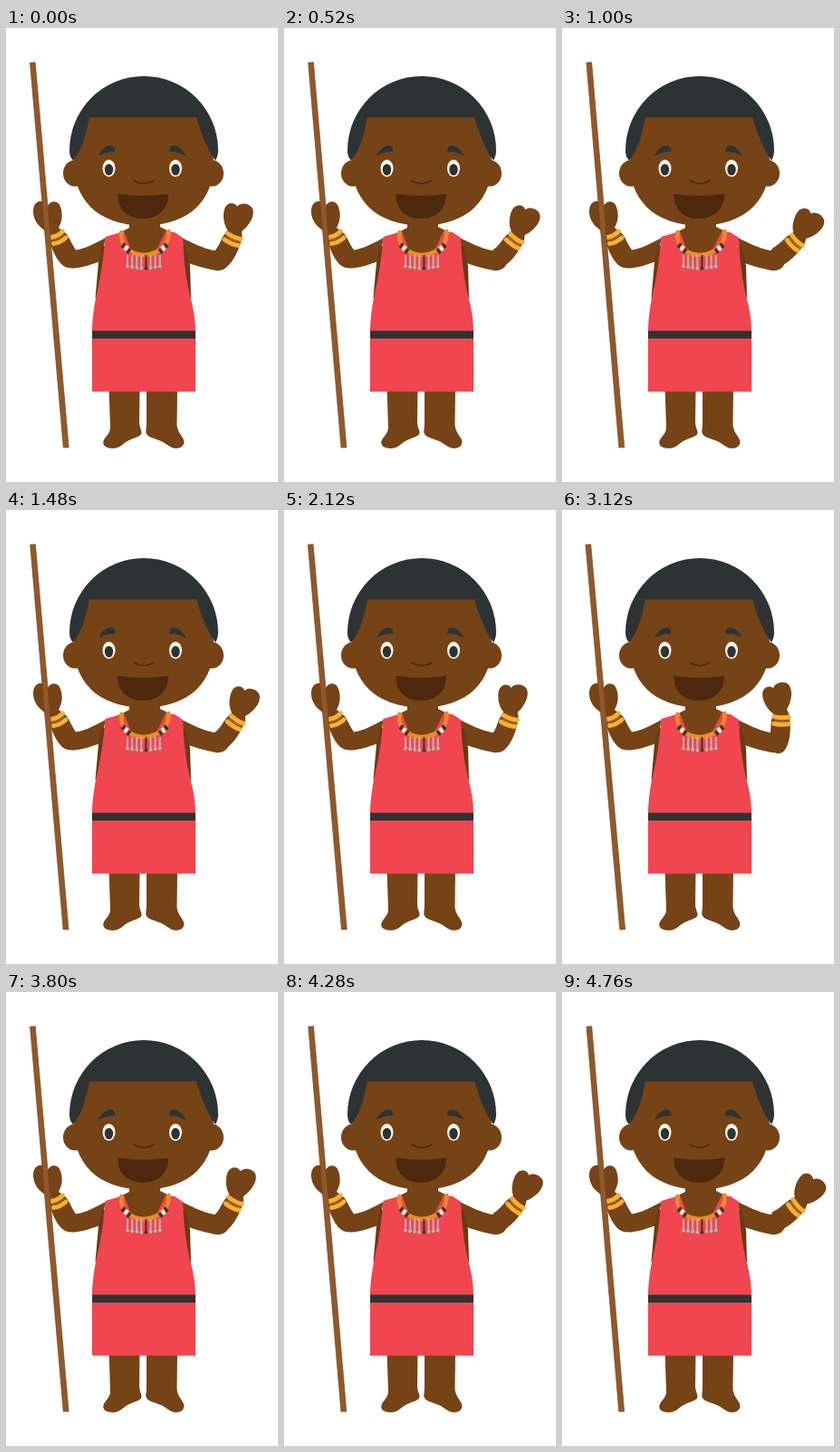
Recreate the animation shown at these times as an HTML page. Size 300x500 px, loop 4.8 s.

```html
<!DOCTYPE html>
<html lang="en">
<head>
<meta charset="utf-8">
<title>Waving child</title>
<style>
  html, body { margin: 0; width: 100%; height: 100%; overflow: hidden; background: #fff; }
  svg { display: block; width: 100vw; height: 100vh; }
  .skin { fill: #764316; }
  .shade { fill: #6a3a11; }
  .dark { fill: #2d3334; }
  .red { fill: #f0464f; }
  .gold { fill: none; stroke: #f6b032; stroke-width: 5; stroke-linecap: round; }
  .seam { fill: none; stroke: #b97a1c; stroke-width: 1; }
</style>
</head>
<body>
<svg viewBox="0 0 300 500" xmlns="http://www.w3.org/2000/svg">
  <!-- legs -->
  <path class="skin" d="M113.500 396H147.500L147 434C147 441 151 444 149 447.500C146 451 138 452 132 456C127 460 124 463 118 463C111 463 106 460 107.500 455C109 450 115 447 115 440Z"/>
  <path class="skin" d="M155 396H189L188.500 437C189 446 196 450 196.500 456C196 462 190 464 184 462.500C178 460 175 456 167 453.500C160 451 156 450 154.500 446C154 443 155 440 155 434Z"/>

  <!-- left arm -->
  <path class="skin" d="M110 231C98 237 88 243 77 244.500C73 239 71 233 67 227L58 220C62 213 63 205 60 197C58 190 49 189 46 196C43 189 34 189 31 196C28 204 32 215 39 220L46 226C49 240 54 253 61 260C68 267 79 266 104 257Z"/>
  <g class="gold">
    <path d="M49.500 230.500Q57 229.500 62.500 224"/>
    <path d="M52.500 237.500Q60 236.500 66 231"/>
  </g>
  <path class="seam" d="M50 234Q58 233 64 227.500"/>

  <!-- right arm -->
  <path class="skin" d="M194 231C206 237 216 242 229 245C240 245 246 250 246 257C245 265 238 268 231 267C220 265 210 262 198 258Z"/>
  <g id="wave">
    <path class="skin" d="M229 247C234 242 236 236 239 230L244.500 222.500C240 217 238.500 205 241.500 198C244 192 252 191 255 196.500C259 191.500 269 193 272 199C275 207 268 218 260 224L260.500 229C258 243 251 257 243.500 263C238 268 230 267 228 259Z"/>
    <g class="gold">
      <path d="M244 226Q252 231.500 259 232.500"/>
      <path d="M241 233Q249 238.500 256 239.500"/>
    </g>
    <path class="seam" d="M242.500 229.500Q250 235 258 236"/>
  </g>

  <!-- torso and dress -->
  <path class="shade" d="M106 240H198L203 262L204 297H98.500L102 258Z"/>
  <path class="skin" d="M136 205H170V219L182 225L160 252H144L124 226L136 220Z"/>
  <path class="red" d="M109.500 230L130 224L139 247Q152 251 165 247L176 224L186 225L195 231C196 258 199 278 203.500 297C207.500 312 209 323 209 336V400.500H95V336C95 322 96.500 311 99 297C104 277 107 258 109.500 230Z"/>

  <path class="dark" d="M95 333.500H209V342H95Z"/>

  <!-- necklace -->
  <path fill="none" stroke="#ea8b29" stroke-width="4.500" d="M128 223C124 239 136 249 152 250C168 249 182 239 179 222"/>
  <g id="beads"></g>

  <!-- head -->
  <ellipse class="skin" cx="76" cy="160" rx="13" ry="14.500"/>
  <ellipse class="skin" cx="227" cy="160" rx="13" ry="14.500"/>
  <path class="skin" d="M85 92H218L229 145C231 188 203 217.500 152 217.500C101 217.500 73 188 75 145Z"/>
  <path class="dark" d="M74 146C71 143 70 139 70 135A82 82 0 0 1 234 135C234 139 233 142 231 146C222 134 215 116 210 98.500H92C88 119 83 136 74 146Z"/>
  <path id="brow" class="dark" d="M102 141C105 134 111 128.500 117 129.500C119 130.500 121 133.500 120 136.500C114 135.500 109 137.500 102 141Z"/>
  <use href="#brow" transform="matrix(-1 0 0 1 300.500 0)"/>
  <g id="eye">
    <ellipse cx="113.500" cy="154.500" rx="7" ry="9.500" fill="#fbf6ea"/>
    <ellipse cx="113.500" cy="156" rx="4.700" ry="6.300" class="dark"/>
  </g>
  <use href="#eye" x="73.500"/>
  <path fill="none" stroke="#4a270d" stroke-width="1.500" stroke-linecap="round" d="M141 168Q152 175 163 168"/>
  <path fill="#4c280e" d="M123.500 182.500Q151 187 179 182.500C179.500 199 168 210 151 210C134 210 122.500 199 123.500 182.500Z"/>

  <!-- staff -->
  <g id="staff">
    <path fill="#925829" stroke="#7a4720" stroke-width="0.700" d="M26.500 38.200L32.200 37.800L69.200 462H63.300Z"/>
  </g>
</svg>
<script>
  const LOOP = 4800, STEP = 40, REST = 18;
  // [time in ms, forearm angle in degrees]
  const keys = [
    [0, 18], [560, 30.5], [1040, 39], [1140, 37.5], [1480, 26.5], [1680, 20.5],
    [2120, 13.5], [2240, 10], [2800, 0], [3060, -4.5], [3360, 4],
    [3800, 21.5], [4480, 38], [4760, 42]
  ];
  const wave = document.getElementById("wave");
  const staff = document.getElementById("staff");
  const beads = document.getElementById("beads");

  function add(name, attrs) {
    const el = document.createElementNS("http://www.w3.org/2000/svg", name);
    for (const k in attrs) el.setAttribute(k, attrs[k]);
    beads.appendChild(el);
  }

  for (let i = 0; i < 8; i++) {
    const x = 134 + i * 5.1, end = 265 - Math.abs(i - 3.5) * 0.7;
    const fill = i === 4 ? "#44342a" : "#b9b4b2";
    add("path", { d: `M${x} 250V${end}`, stroke: fill, "stroke-width": 2 });
    add("circle", { cx: x, cy: end, r: 1.9, fill });
  }
  for (const [x, y, tilt] of [[131.5, 241.5, 35], [174.5, 241.5, -35]]) {
    const side = Math.sign(tilt);
    const bead = (dx, fill) => add("rect", {
      x: -1.5, y: -3, width: 3, height: 6, fill,
      transform: `translate(${x + dx * side} ${y + dx}) rotate(${tilt})`
    });
    bead(-2, "#333");
    bead(1, "#fff");
    bead(4, "#333");
  }

  const slope = i => (keys[i + 1][1] - keys[i][1]) / (keys[i + 1][0] - keys[i][0]);

  // Harmonic mean keeps the curve from overshooting the keys.
  function tangent(i) {
    if (i === 0) return slope(0);
    if (i === keys.length - 1) return slope(i - 1);
    const a = slope(i - 1), b = slope(i);
    return a * b > 0 ? 2 * a * b / (a + b) : 0;
  }

  function angleAt(t) {
    let i = 0;
    while (i < keys.length - 2 && t > keys[i + 1][0]) i++;
    const [t0, a] = keys[i], [t1, b] = keys[i + 1];
    const h = t1 - t0, u = (t - t0) / h, v = 1 - u;
    return v * v * (1 + 2 * u) * a + u * u * (3 - 2 * u) * b
      + h * u * v * (v * tangent(i) - u * tangent(i + 1));
  }

  function draw(now) {
    const t = Math.floor((now % LOOP) / STEP) * STEP;
    const turn = angleAt(t) - REST;
    wave.setAttribute("transform", `rotate(${turn} 243 253)`);
    staff.setAttribute("transform", `rotate(${turn * 0.006} 48 250)`);
  }

  let start;
  function tick(now) {
    if (start === undefined) start = now;
    draw(now - start);
    requestAnimationFrame(tick);
  }
  draw(0);
  requestAnimationFrame(tick);
</script>
</body>
</html>
```
